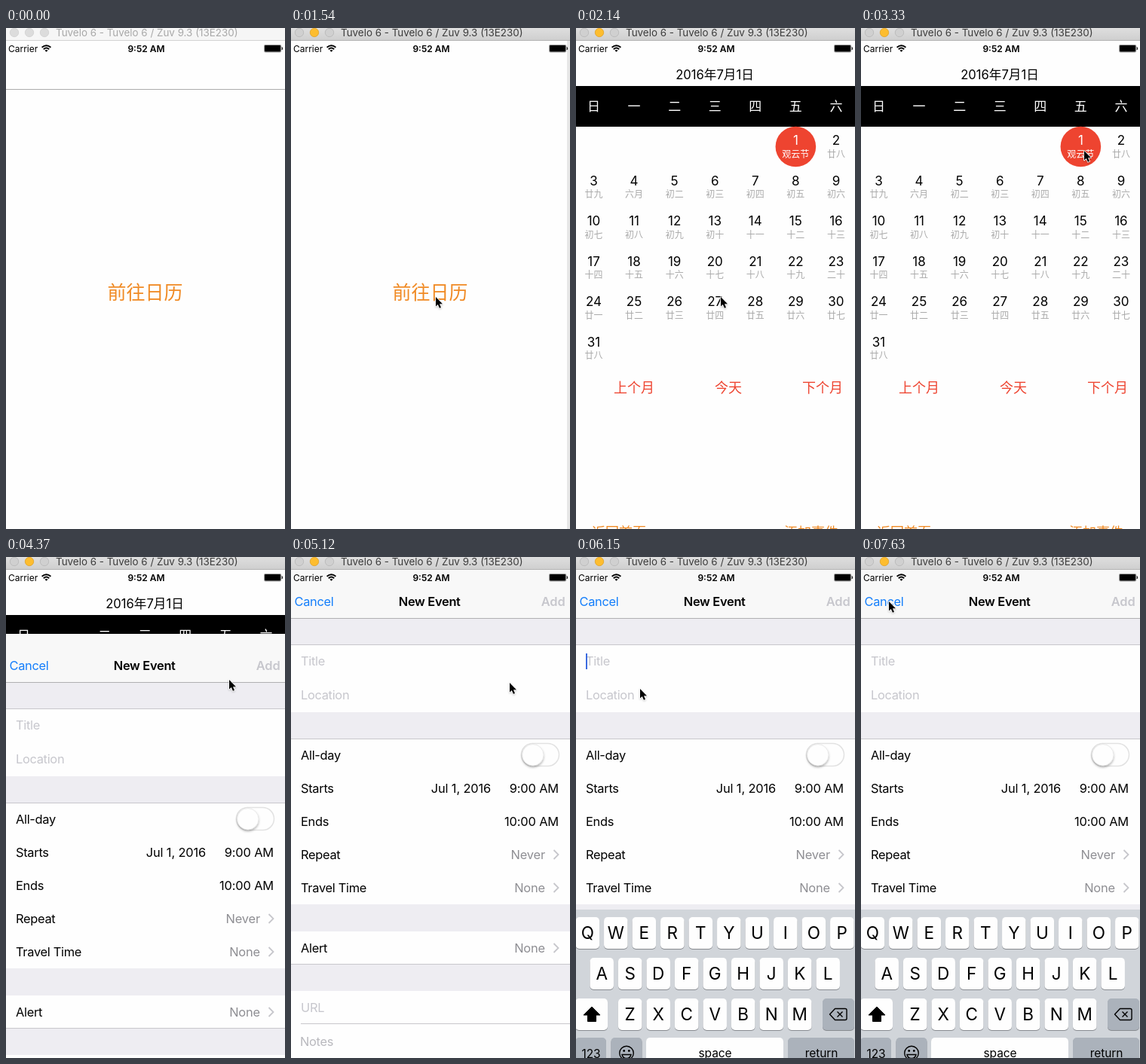
Write an HTML page that moves like this. It is 370 px wide and 665 px high and loops after 8000 ms.

```html
<!DOCTYPE html>
<html lang="zh-CN">
<head>
<meta charset="utf-8">
<title>Calendar</title>
<style>
html, body { margin: 0; width: 100%; height: 100%; overflow: hidden; background: #fefefe; }
svg { display: block; width: 370px; height: 665px; overflow: hidden; }
text { font-family: Inter, "Noto Sans CJK SC", "Noto Sans CJK", sans-serif; }
.mid { text-anchor: middle; }
.end { text-anchor: end; }
.orange { fill: #f08a24; }
.red { fill: #ee4430; }
.title { font-size: 13.4px; }
.status { font-size: 12px; }
.bold { font-weight: 600; }
.date { font-size: 16.6px; }
.day { font-size: 17px; }
.lunar { font-size: 12px; fill: #a9a9a9; }
.white { fill: #fff; }
.button { font-size: 18px; }
.form { font-size: 16.4px; letter-spacing: -.3px; }
.form.end { letter-spacing: -.15px; }
.hint { fill: #c7c7cd; }
.note { fill: #b9b9be; }
.value { fill: #8e8e93; }
.key { font-size: 22.5px; }
.word { font-size: 15.5px; letter-spacing: -.1px; }

.anim { animation: 8s step-end -10ms infinite; }
#active { opacity: 0; animation-name: activate; }
#navLine { animation-name: hideNav; }
#home { animation-name: parallax; }
#calendar { transform: translateX(385px); animation-name: push; }
#sheet { transform: translateY(660px); animation-name: present; }
#keyboard { transform: translateY(210px); animation-name: raise; }
#caret { opacity: 0; animation-name: blink; }
#cursor { transform: translate(390px, 470px); animation-name: point; }

@keyframes activate { 19.25%, 100% { opacity: 1; } }
@keyframes hideNav { 19.25%, 100% { opacity: 0; } }
@keyframes parallax {
  21.125% { transform: translateX(-55px); }
  23% { transform: translateX(-97px); }
  24.875%, 100% { transform: translateX(-109px); }
}
@keyframes push {
  19.25% { transform: translateX(371px); }
  21.125% { transform: translateX(185px); }
  23% { transform: translateX(48px); }
  24.875% { transform: translateX(9px); }
  26.75%, 100% { transform: none; }
}
@keyframes present {
  52.875% { transform: translateY(310px); }
  54.625% { transform: translateY(85px); }
  56.5% { transform: translateY(18px); }
  58.375% { transform: translateY(3px); }
  60.25%, 100% { transform: none; }
}
@keyframes raise {
  71.375% { transform: translateY(90px); }
  73.25% { transform: translateY(8px); }
  75%, 100% { transform: none; }
}
@keyframes blink {
  71.375% { opacity: 1; }
  80.625% { opacity: .5; }
  82.5% { opacity: 0; }
  86.25% { opacity: .5; }
  88% { opacity: 1; }
  93.5% { opacity: .5; }
  95.375%, 100% { opacity: 0; }
}
@keyframes point {
  6.25% { transform: translate(309px, 470px); }
  8.125% { transform: translate(284px, 444px); }
  10% { transform: translate(245px, 404px); }
  11.875% { transform: translate(212px, 373px); }
  13.75% { transform: translate(196px, 359px); }
  15.625% { transform: translate(192px, 357px); }
  30.5% { transform: translate(199px, 344px); }
  32.375% { transform: translate(228px, 290px); }
  34.25% { transform: translate(261px, 216px); }
  36.125% { transform: translate(284px, 152px); }
  38% { transform: translate(293px, 122px); }
  39.75% { transform: translate(295px, 144px); }
  41.625% { transform: translate(296px, 163px); }
  64% { transform: translate(290px, 167px); }
  65.875% { transform: translate(240px, 163px); }
  67.75% { transform: translate(158px, 157px); }
  69.5% { transform: translate(96px, 148px); }
  71.375% { transform: translate(82px, 146px); }
  73.25% { transform: translate(81px, 152px); }
  75% { transform: translate(83px, 165px); }
  76.875% { transform: translate(85px, 175px); }
  80.625% { transform: translate(79px, 160px); }
  82.5% { transform: translate(62px, 120px); }
  84.375% { transform: translate(46px, 82px); }
  86.25% { transform: translate(39px, 64px); }
  88%, 100% { transform: translate(37px, 59px); }
}
</style>
</head>
<body>
<svg viewBox="0 0 370 665">
  <defs>
    <linearGradient id="bar" x2="0" y2="1">
      <stop stop-color="#dedede"/><stop offset="1" stop-color="#cfcfcf"/>
    </linearGradient>
    <filter id="soft" x="-50%" y="-50%" width="200%" height="200%">
      <feDropShadow dx="0" dy="2" stdDeviation="1.5" flood-opacity=".3"/>
    </filter>
  </defs>
  <rect width="370" height="665" fill="#fefefe"/>
  <path id="navLine" class="anim" d="M0 81.5H370" stroke="#acacac"/>
  <g id="home" class="anim">
    <text class="mid orange" x="184.5" y="359.5" font-size="25">前往日历</text>
  </g>
  <g id="calendar" class="anim"></g>
  <g id="sheet" class="anim">
    <g id="form"></g>
    <rect id="caret" class="anim" x="13" y="128" width="2" height="21" fill="#3b6be0"/>
    <g id="keyboard" class="anim"></g>
  </g>
  <g id="statusBar">
    <text class="status" x="3" y="31.5">Carrier</text>
    <g fill="none" stroke="#000" stroke-width="1.9">
      <path d="M47.6 25.7Q53.5 20.6 59.4 25.7M49.8 28.2Q53.5 25 57.2 28.2"/>
      <path d="M53.5 31.8L51.4 29.7Q53.5 28.2 55.6 29.7Z" fill="#000" stroke="none"/>
    </g>
    <text class="status bold mid" x="186" y="31.5">9:52 AM</text>
    <rect x="342.4" y="22.4" width="22.4" height="9.6" rx="1.5" fill="none" stroke="#777" stroke-width=".7"/>
    <rect x="343" y="23" width="21.2" height="8.4" rx=".8"/>
    <path d="M366 25.4Q367.6 27.2 366 29Z" stroke="#000" stroke-width=".6"/>
  </g>
  <g id="idle"></g>
  <g id="active" class="anim"></g>
  <path id="cursor" class="anim" d="M0 0V12.6L2.8 9.9L4.9 14.8L7 13.9L5 9.2H9Z"
    stroke="#fff" stroke-width="1.6" stroke-linejoin="round" paint-order="stroke"
    style="filter:drop-shadow(0 1px .8px #0003)"/>
</svg>
<script>
const fill = (id, ...parts) => document.getElementById(id).innerHTML = parts.flat().join('');
const text = (x, y, s, cls) => `<text x="${x}" y="${y}" class="${cls}">${s}</text>`;
const rect = (x, y, w, h, color, extra = '') =>
  `<rect x="${x}" y="${y}" width="${w}" height="${h}" fill="${color}" ${extra}/>`;
const line = (x, y, color = '#c8c7cc') => `<path d="M${x} ${y}H370" stroke="${color}"/>`;

// Window title bar
const titleBar = (bg, edge, ink, dots, rims) => [
  rect(0, 0, 370, 16, bg),
  line(0, 16.5, edge),
  dots.map((c, i) => `<circle cx="${11 + 20 * i}" cy="6" r="5.7" fill="${c}" stroke="${rims[i]}" stroke-width=".8"/>`),
  `<g fill="${ink}">${text(66, 11, 'Tuvelo 6 - Tuvelo 6 / Zuv 9.3 (13E230)', 'title')}</g>`
].flat();
const grey = '#dcdcdc', rim = '#d0d0d0';
fill('idle', titleBar('#f6f6f6', '#d2d2d2', '#a8a8a8', [grey, grey, grey], [rim, rim, rim]));
fill('active', titleBar('url(#bar)', '#b3b3b3', '#3c3c3c',
  ['#d0d0d0', '#fdbd2f', '#d0d0d0'], ['#b7b7b7', '#e0a128', '#b7b7b7']));

// Month view
const cell = 375 / 7;
const column = i => 23.5 + cell * i;
const numerals = '一二三四五六七八九十';
function lunar(day) {
  if (day === 1) return '观云节';
  if (day === 4) return '六月';
  const n = day < 4 ? day + 26 : day - 3;
  if (n === 20) return '二十';
  return (n <= 10 ? '初' : n < 20 ? '十' : '廿') + numerals[(n - 1) % 10];
}
function dayCell(day) {
  const slot = day + 4, x = column(slot % 7), y = 131 + cell * Math.floor(slot / 7);
  const first = day === 1, white = first ? ' white' : '';
  return (first ? `<circle cx="${x}" cy="${y + 26.5}" r="26.8" class="red"/>` : '') +
    text(x, y + 24, day, 'day mid' + white) + text(x, y + 40.5, lunar(day), 'lunar mid' + white);
}
fill('calendar',
  rect(-5, 17, 5, 648, '#e6e6e6'),
  rect(0, 17, 372, 648, '#fefefe'),
  text(184, 68, '2016年7月1日', 'date mid'),
  rect(0, 77, 372, 54, '#000'),
  [...'日一二三四五六'].map((s, i) => text(column(i), 109.5, s, 'day mid white')),
  Array.from({ length: 31 }, (_, i) => dayCell(i + 1)),
  ['上个月', '今天', '下个月'].map((s, i) => text(77 + 125 * i, 484, s, 'button mid red')),
  text(57, 675.5, '返回首页', 'button mid orange'),
  text(312, 675.5, '添加事件', 'button mid orange'));

// Event form
const row = (y, label, value) => text(13, y, label, 'form') + (value
  ? text(337, y, value, 'form end value') +
    `<path d="M348.5 ${y - 12}l6 6l-6 6" fill="none" stroke="#c7c7cc" stroke-width="1.8"/>` : '');
fill('form',
  rect(0, 17, 370, 660, '#eeedf2'),
  rect(0, 17, 370, 64, '#f8f8f8'),
  line(0, 81.5, '#b0b0b2'),
  `<g fill="#147efb">${text(4.5, 65, 'Cancel', 'form')}</g>`,
  text(183.7, 65, 'New Event', 'form bold mid'),
  text(363.5, 65, 'Add', 'form bold end hint'),
  [[117, 89], [242, 219], [497, 43], [576, 100]].map(([y, h]) => rect(0, y, 370, h, '#fefefe')),
  line(0, 116.5), line(0, 241.5), line(0, 540.5), line(13, 619.5),
  text(13, 144, 'Title', 'form hint'),
  text(13, 189, 'Location', 'form hint'),
  row(269, 'All-day'), row(313, 'Starts'), row(357, 'Ends'),
  row(401, 'Repeat', 'Never'), row(445, 'Travel Time', 'None'), row(525, 'Alert', 'None'),
  text(265, 313, 'Jul 1, 2016', 'form end'),
  text(355, 313, '9:00 AM', 'form end'),
  text(355, 357, '10:00 AM', 'form end'),
  rect(305.5, 247.5, 50, 30, '#fefefe', 'rx="15" stroke="#e2e2e2" stroke-width="1.5"'),
  '<circle cx="320.8" cy="262.8" r="14.2" fill="#fefefe" stroke="#d4d4d4" stroke-width=".5" filter="url(#soft)"/>',
  text(13, 604, 'URL', 'form hint'),
  text(12, 649, 'Notes', 'form note'));

// Keyboard
const dark = '#abb2bb';
const key = (x, y, w, color = '#fefefe') =>
  rect(x, y + 1, w, 42, '#888b90', 'rx="5"') + rect(x, y, w, 42, color, 'rx="5"');
const letters = (s, x, y) => [...s].map((c, i) => {
  const mid = x + 37.5 * i;
  return key(mid - 15.75, y, 31.5) + text(mid, y + 29, c, 'key mid');
});
fill('keyboard',
  rect(0, 468, 370, 250, '#d1d5da'),
  letters('QWERTYUIOP', 15.3, 478),
  letters('ASDFGHJKL', 34.2, 532),
  letters('ZXCVBNM', 71.7, 586),
  key(-1, 586, 43),
  '<path d="M21 597L32 608H26.5V616.5H15.5V608H10Z" stroke="#000" stroke-linejoin="round"/>',
  key(327, 586, 42, dark),
  `<g fill="none" stroke="#000" stroke-width="1.4" stroke-linejoin="round">
    <path d="M336.5 607L343.5 599.5H357Q359 599.5 359 601.5V612.5Q359 614.5 357 614.5H343.5Z"/>
    <path d="M346.5 603.5l7 7m0 -7l-7 7"/></g>`,
  key(-1, 638, 41, dark), text(20, 664.5, '123', 'word mid'),
  key(46.5, 638, 41, dark),
  `<g fill="none" stroke="#000" stroke-width="1.4"><circle cx="67" cy="658.5" r="9.3"/>
    <path d="M61 660.5H73Q72 665.5 67 665.5T61 660.5Z"/></g>
    <circle cx="63.7" cy="655.5" r="1.4"/><circle cx="70.3" cy="655.5" r="1.4"/>`,
  key(93, 638, 182), text(184.5, 664, 'space', 'word mid'),
  key(281, 638, 88, dark), text(325.5, 664, 'return', 'word mid'));
</script>
</body>
</html>
```
